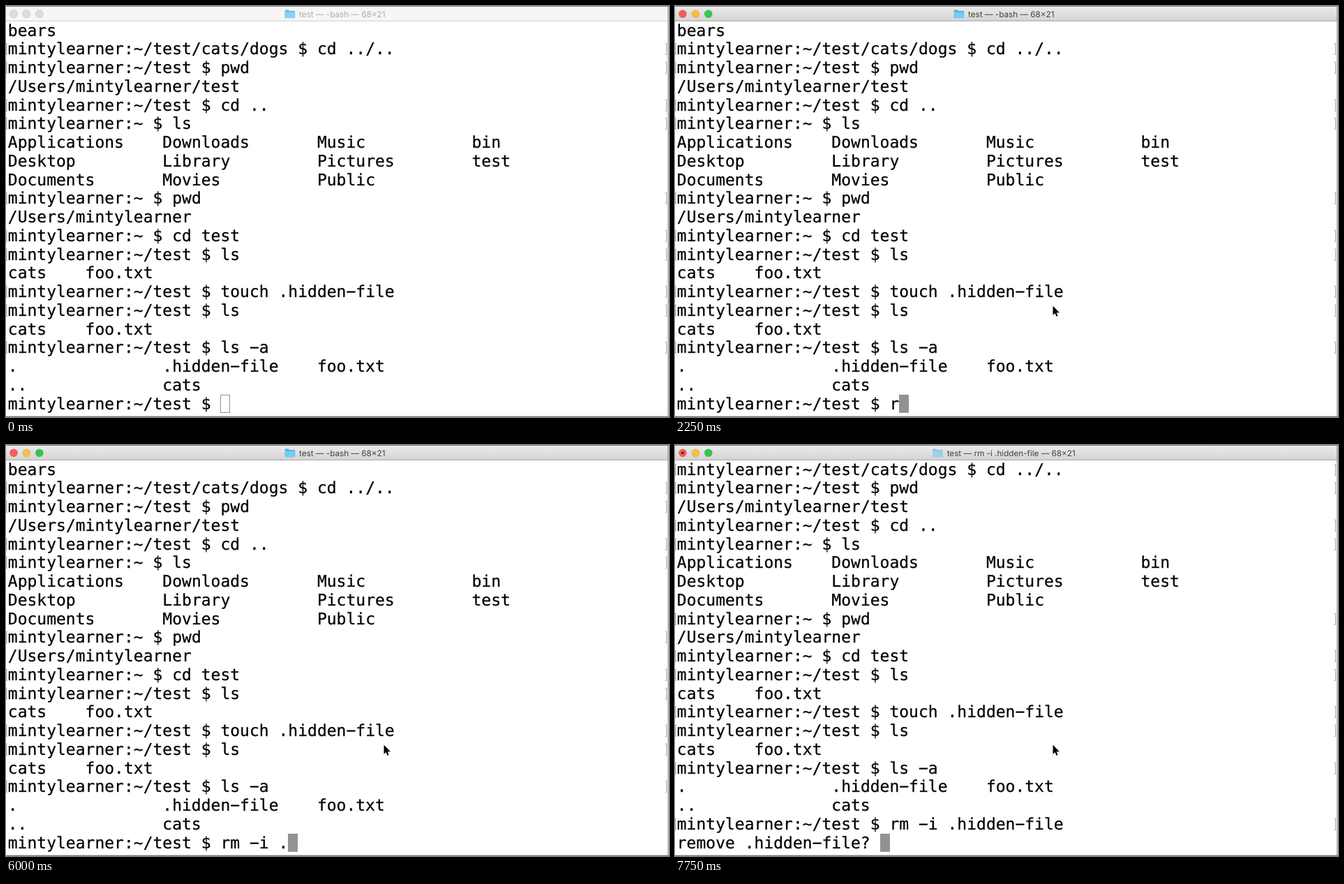
Write an HTML page that moves like this. It is 950x589 px and loops after 8 s.

```html
<!DOCTYPE html>
<html lang="en">
<head>
<meta charset="utf-8">
<title>Terminal</title>
<style>
  html, body { margin: 0; width: 100%; height: 100%; overflow: hidden; background: #fff; }
  svg { display: block; width: 950px; height: 589px; }
  text { white-space: pre; text-rendering: geometricPrecision; }
  .row { font: 23px "DejaVu Sans Mono", monospace; stroke: #000; stroke-width: .25; }
  .title { font: 11.7px Inter, sans-serif; text-anchor: middle; }
  .mark { fill: none; stroke: #a4a4a4; }
</style>
</head>
<body>
<svg viewBox="0 0 950 589">
  <defs>
    <linearGradient id="active" x2="0" y2="1">
      <stop stop-color="#ececec"/><stop offset="1" stop-color="#d3d3d3"/>
    </linearGradient>
  </defs>
  <rect width="950" height="589" fill="#fff"/>
  <rect id="bar" width="949" height="22"/>
  <path id="rule" d="M0 21.5H949"/>
  <path d="M0 .5H950M948.9 0V589M0 588.4H950" stroke="#747b87" stroke-width="1.1"/>
  <g id="buttons"></g>
  <circle id="dot" cx="11" cy="11.3" r="1.9" fill="#7a1410"/>
  <g id="folder">
    <path d="M0 1.2Q0 0 1.2 0H5L6.4 1.5H13.3Q14.5 1.5 14.5 2.7V11H0Z" fill="#4fb2e3"/>
    <path d="M0 3.2H14.5V10.6Q14.5 11.8 13.3 11.8H1.2Q0 11.8 0 10.6Z" fill="#74cbf4"/>
  </g>
  <text id="title" class="title" x="481.7" y="15.6"></text>
  <rect id="caret" stroke="#929292"/>
  <g id="marks"></g>
  <!-- The tiny turn keeps baselines from snapping to whole pixels. -->
  <g id="screen" transform="rotate(.002)"></g>
  <path id="pointer" d="M1 .8V14L4 11.3L6 16L8.1 15.1L6.1 10.6H10.4Z"
        fill="#000" stroke="#fff" stroke-width="1.1" paint-order="stroke"/>
</svg>
<script>
const LOOP = 8000, FOCUS = 1000, ENTER = 7750, MARKED = 6750;
const CELL = 13.847, LINE = 26.75, LEFT = 2.8, TOP = 22, BASE = 20.7;
const NS = "http://www.w3.org/2000/svg";
const $ = id => document.getElementById(id);

function set(el, attrs) {
  for (const k in attrs) el.setAttribute(k, attrs[k]);
  return el;
}
const add = (parent, tag, attrs) =>
  parent.appendChild(set(document.createElementNS(NS, tag), attrs));

const USER = "mintylearner";
const prompt = (dir, cmd) => ({ text: `${USER}:${dir} $ ${cmd}`, mark: true });
const out = (...cells) => ({ text: cells.map(c => c.padEnd(16)).join("").trimEnd() });
const files = { text: "cats    foo.txt" };

const history = [
  out("bears"),
  prompt("~/test/cats/dogs", "cd ../.."),
  prompt("~/test", "pwd"),
  out(`/Users/${USER}/test`),
  prompt("~/test", "cd .."),
  prompt("~", "ls"),
  out("Applications", "Downloads", "Music", "bin"),
  out("Desktop", "Library", "Pictures", "test"),
  out("Documents", "Movies", "Public"),
  prompt("~", "pwd"),
  out(`/Users/${USER}`),
  prompt("~", "cd test"),
  prompt("~/test", "ls"),
  files,
  prompt("~/test", "touch .hidden-file"),
  prompt("~/test", "ls"),
  files,
  prompt("~/test", "ls -a"),
  out(".", ".hidden-file", "foo.txt"),
  out("..", "cats")
];

const typing = [
  [0, ""], [2250, "r"], [3500, "rm "], [4250, "rm -"], [4500, "rm -i"],
  [4750, "rm -i "], [6000, "rm -i ."], [6250, "rm -i .h"],
  [6500, "rm -i .hi"], [6750, "rm -i .hidden-file "]
];
const moves = [
  [500, [375, 242]], [750, [426, 445]], [1000, [438, 441.5]],
  [1250, [538, 432]], [1500, [540.5, 429]]
];
const latest = (steps, t) => steps.reduce((v, s) => t >= s[0] ? s[1] : v, null);

const lights = ["#fc5b55", "#fcbd3f", "#34c84b"].map((color, i) => ({
  color, el: add($("buttons"), "circle", { cx: 11 + 18.4 * i, cy: 11.3, r: 5.6 })
}));

const rows = Array.from({ length: 21 }, (_, i) => {
  const y = TOP + i * LINE, a = Math.floor(y) + 5.5, b = a + 16;
  return {
    text: add($("screen"), "text", { class: "row", x: LEFT, y: y + BASE }),
    mark: add($("marks"), "path", {
      class: "mark", d: `M2 ${a}H.5V${b}H2M944.5 ${a}H946.5V${b}H944.5`
    })
  };
});

function linesAt(t) {
  const current = prompt("~/test", latest(typing, t));
  current.mark = t >= MARKED;
  const lines = [...history, current];
  return t < ENTER ? lines : [...lines.slice(1), { text: "remove .hidden-file? " }];
}

function drawWindow(t) {
  const active = t >= FOCUS, running = t >= ENTER;
  set($("bar"), { fill: active ? "url(#active)" : "#f6f6f6" });
  set($("rule"), { stroke: active ? "#aaa" : "#d0d0d0" });
  for (const { el, color } of lights) {
    set(el, {
      fill: active ? color : "#dcdcdc",
      stroke: active ? "rgba(0,0,0,.12)" : "#c9c9c9",
      "stroke-width": .8
    });
  }
  set($("dot"), { visibility: running ? "visible" : "hidden" });
  set($("folder"), {
    transform: `translate(${running ? 369 : 399.7} 5.6)`,
    opacity: running ? .6 : active ? 1 : .85
  });
  set($("title"), { fill: active ? "#404040" : "#acacac" });
  $("title").textContent = `test — ${running ? "rm -i .hidden-file" : "-bash"} — 68×21`;
}

function drawScreen(t) {
  const lines = linesAt(t), active = t >= FOCUS;
  rows.forEach((row, i) => {
    // The terminal face has a wide hyphen.
    row.text.textContent = lines[i].text.replace(/-/g, "\u2212");
    set(row.mark, { visibility: lines[i].mark ? "visible" : "hidden" });
  });
  const x = Math.round(LEFT + lines[20].text.length * CELL);
  set($("caret"), {
    x: x + .5, y: 557.5, width: 13, height: 25,
    fill: active ? "#929292" : "#fff"
  });
}

function drawPointer(t) {
  const at = latest(moves, t);
  set($("pointer"), {
    visibility: at ? "visible" : "hidden",
    transform: `translate(${at || "0,0"})`
  });
}

let shown = -1;
function draw(now) {
  // Every change falls on a quarter second.
  const t = Math.floor(now % LOOP / 250) * 250;
  if (t !== shown) {
    shown = t;
    drawWindow(t);
    drawScreen(t);
    drawPointer(t);
  }
}

let start;
function tick(now) {
  start ??= now;
  draw(now - start);
  requestAnimationFrame(tick);
}
draw(0);
requestAnimationFrame(tick);
</script>
</body>
</html>
```
